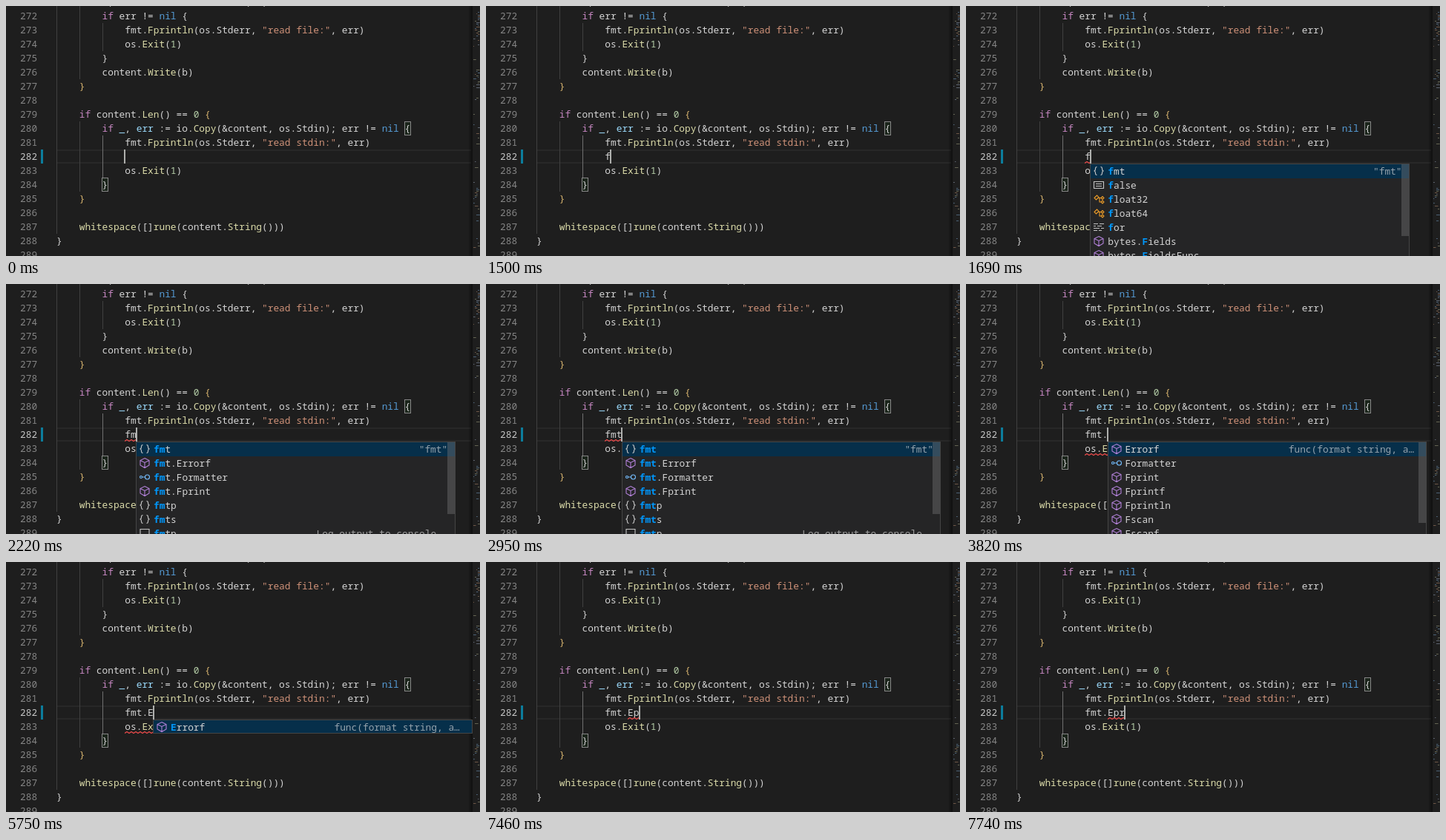
An HTML page with a canvas for the animation above (8000 ms loop, 639x338 px).

```html
<!DOCTYPE html>
<html lang="en">
<head>
<meta charset="utf-8">
<title>Code completion</title>
<style>
html, body { margin: 0; height: 100%; overflow: hidden; background: #1e1e1e; }
canvas { display: block; width: 639px; height: 338px; }
</style>
</head>
<body>
<canvas id="stage"></canvas>
<script>
const W = 639, H = 338, LOOP = 8000;
const CHAR = 7.697, LEFT = 67.93, ROW = 19, FIRST = 271, CURRENT = 282;
const FONT = '12.83px "Noto Sans Mono", "DejaVu Sans Mono", monospace';

const code = `        b, err := ioutil.ReadFile(fn)
        if err != nil {
            fmt.Fprintln(os.Stderr, "read file:", err)
            os.Exit(1)
        }
        content.Write(b)
    }

    if content.Len() == 0 {
        if _, err := io.Copy(&content, os.Stdin); err != nil {
            fmt.Fprintln(os.Stderr, "read stdin:", err)

            os.Exit(1)
        }
    }

    whitespace([]rune(content.String()))
}
`.split('\n');

// string, keyword, constant, number, call, assigned variable, other
const TOKEN = /(".*?")|(\bif\b)|(\bnil\b)|(\b\d+\b)|(\w+(?=\())|(\b(?:_|b|err)\b(?=.*:=))|\w+|[^\w\s"]+/g;
const COLORS = ['#ce9178', '#c586c0', '#569cd6', '#b5cea8', '#dcdcaa', '#9cdcfe'];
const PLAIN = '#d4d4d4', GOLD = '#d9b56f';

const ICONS = {
  module: ['#c5c5c5', 'M5.5 2.5Q3.5 2.5 3.5 5Q3.5 8 1.5 8Q3.5 8 3.5 11Q3.5 13.5 5.5 13.5M10.5 2.5Q12.5 2.5 12.5 5Q12.5 8 14.5 8Q12.5 8 12.5 11Q12.5 13.5 10.5 13.5'],
  value: ['#c5c5c5', 'M1.5 3.5H14.5V12.5H1.5ZM4 6.5H12M4 9.5H12'],
  type: ['#ee9d28', 'M2 6.5L5.5 3L8 5.5L4.5 9ZM7 6.5H11M9 6.5V12H11M11 6.5L13 4.5L15 6.5L13 8.5ZM11 12L13 10L15 12L13 14Z'],
  keyword: ['#c5c5c5', 'M1 3.5H7M9 3.5H15M1 6.5H4M6 6.5H12M1 9.5H9M11 9.5H15M1 12.5H6M8 12.5H12'],
  func: ['#b180d7', 'M8 1.5L14 4.5V11L8 14.5L2 11V4.5ZM2 4.5L8 7.5L14 4.5M8 7.5V14.5'],
  iface: ['#75beff', 'M1.5 8a1.5 1.5 0 1 0 3 0a1.5 1.5 0 1 0 -3 0M4.5 8H8.5M8.5 8a3 3 0 1 0 6 0a3 3 0 1 0 -6 0'],
  snippet: ['#c5c5c5', 'M2 2.5H14V13.5H2Z']
};
for (const icon of Object.values(ICONS)) icon[1] = new Path2D(icon[1]);

// each item: icon, label, detail, gap between the detail and the right edge
const FMT = ['module', 'fmt', '"fmt"', 11];
const ERRORF = ['func', 'Errorf', 'func(format string, a…', 17.5];
const LISTS = {
  letter: [FMT, ['value', 'false'], ['type', 'float32'], ['type', 'float64'],
    ['keyword', 'for'], ['func', 'bytes.Fields'], ['func', 'bytes.FieldsFunc']],
  word: [FMT, ['func', 'fmt.Errorf'], ['iface', 'fmt.Formatter'], ['func', 'fmt.Fprint'],
    ['module', 'fmtp'], ['module', 'fmts'], ['snippet', 'fmtp', 'Log output to console', 26]],
  members: [ERRORF, ['iface', 'Formatter'], ['func', 'Fprint'], ['func', 'Fprintf'],
    ['func', 'Fprintln'], ['func', 'Fscan'], ['func', 'Fscanf']],
  single: [ERRORF]
};
const KEYS = [[0, ''], [1500, 'f'], [2220, 'fm'], [2890, 'fmt'], [3700, 'fmt.'],
  [5750, 'fmt.E'], [7460, 'fmt.Ep'], [7740, 'fmt.Epr']];
const POPUPS = [[0, ''], [1530, 'letter'], [2220, 'word'], [3700, ''], [3760, 'members'],
  [5750, 'single'], [7460, '']];

const canvas = document.getElementById('stage');
const dpr = window.devicePixelRatio || 1;
canvas.width = W * dpr;
canvas.height = H * dpr;
const ctx = canvas.getContext('2d');
ctx.scale(dpr, dpr);

const at = (steps, t) => steps.filter(s => s[0] <= t).pop()[1];
const rowTop = n => 194 + (n - CURRENT) * ROW;
const colX = c => LEFT + c * CHAR;

function rect(x, y, w, h, color) {
  ctx.fillStyle = color;
  ctx.fillRect(x, y, w, h);
}

function text(s, x, top, color, bold) {
  ctx.font = (bold ? 'bold ' : '') + FONT;
  ctx.fillStyle = color;
  ctx.fillText(s, x, top + 14);
}

function codeLine(line, n) {
  const indent = line.search(/\S/);
  for (const m of line.matchAll(TOKEN)) {
    const kind = m.slice(1).findIndex(Boolean);
    const color = indent === 4 && /[{}]/.test(m[0]) ? GOLD : COLORS[kind] || PLAIN;
    text(m[0], colX(m.index), rowTop(n), color);
  }
}

function guide(col, from, to, color = '#404040') {
  rect(Math.round(colX(col)), rowTop(from), 1, (to - from + 1) * ROW, color);
}

function bracketBox(col, n) {
  const x = Math.floor(colX(col)), y = rowTop(n);
  rect(x, y, 9, ROW, 'rgba(0,100,0,.1)');
  ctx.strokeStyle = '#888';
  ctx.lineWidth = 1;
  ctx.strokeRect(x + .5, y + .5, 8, ROW - 1);
}

function squiggle(col, length, n) {
  const x = Math.floor(colX(col)), w = length * CHAR, y = rowTop(n) + 17.5;
  ctx.save();
  ctx.beginPath();
  ctx.rect(x, y - 2, w, 4);
  ctx.clip();
  ctx.beginPath();
  for (let i = 0; i * 3 <= w + 3; i++) ctx.lineTo(x + i * 3, y + (i % 2 ? -1 : 1));
  ctx.strokeStyle = '#f14c4c';
  ctx.lineWidth = 1.1;
  ctx.stroke();
  ctx.restore();
}

function minimap() {
  const shadow = ctx.createLinearGradient(623, 0, 629, 0);
  shadow.addColorStop(0, 'rgba(0,0,0,0)');
  shadow.addColorStop(1, 'rgba(0,0,0,.5)');
  rect(623, 0, 6, H, shadow);
  rect(629, 0, 10, H, '#1e1e1e');
  let seed = 7;
  const rand = () => (seed = seed * 16807 % 2147483647) / 2147483647;
  const tints = ['#5d6470', '#4b6175', '#6d5646', '#656553'];
  for (let y = 2; y < H; y += 2) {
    const dense = (y > 6 && y < 56) || (y > 82 && y < 112) || (y > 244 && y < 262);
    const x = 630 + Math.floor(rand() * 4) * 2, w = 1 + rand() * 4;
    const tint = tints[Math.floor(rand() * 4)];
    if (rand() < (dense ? .75 : .2)) rect(x, y, Math.min(w, W - x), 1, tint);
  }
}

function popup(name, x, typed) {
  const items = LISTS[name], left = Math.floor(x), right = Math.floor(x + 430.5);
  const top = rowTop(CURRENT + 1), height = items.length > 1 ? 230 : ROW;
  const query = typed.split('.').pop().toLowerCase();
  ctx.save();
  ctx.beginPath();
  ctx.rect(left, top, right - left, height);
  ctx.clip();
  rect(left, top, right - left, height, '#454545');
  rect(left + 1, top + 1, right - left - 2, height - 2, '#252526');
  rect(left + 1, top + 1, right - left - 2, items.length > 1 ? ROW : ROW - 2, '#062f4a');
  items.forEach(([kind, label, detail, gap], i) => {
    const y = top + 1 + i * ROW, labelX = x + 23.3;
    const [color, path] = ICONS[kind];
    ctx.save();
    ctx.translate(left + 4, y + 1);
    ctx.strokeStyle = color;
    ctx.lineWidth = 1.1;
    ctx.stroke(path);
    ctx.restore();
    const from = label.toLowerCase().indexOf(query), to = from + query.length;
    text(label.slice(0, from), labelX, y, PLAIN);
    text(label.slice(from, to), labelX + from * CHAR, y, '#0097fb', true);
    text(label.slice(to), labelX + to * CHAR, y, PLAIN);
    if (detail) text(detail, x + 430.5 - gap - detail.length * CHAR, y, i ? '#9f9f9f' : '#96a3ad');
  });
  if (items.length > 1) {
    rect(right - 11, top + 1, 10, name === 'members' ? 109 : 97, 'rgba(121,121,121,.4)');
  }
  ctx.restore();
}

function draw(t) {
  const typed = at(KEYS, t), list = at(POPUPS, t);
  const caret = colX(12 + typed.length), top = rowTop(CURRENT);
  rect(0, 0, W, H, '#1e1e1e');

  rect(68, top, 559, ROW, '#282828');
  rect(68, top + 2, 559, ROW - 4, '#1e1e1e');
  rect(47, top, 3, ROW, '#0c7d9d');

  guide(0, 271, 287);
  guide(4, 271, 276);
  guide(4, 280, 284);
  guide(8, 273, 274);
  guide(8, 281, 283, '#707070');
  bracketBox(61, 280);
  bracketBox(8, 284);

  code.forEach((line, i) => {
    const n = FIRST + i;
    text(String(n), 19, rowTop(n), n === CURRENT ? '#c6c6c6' : '#858585');
    codeLine(line, n);
  });
  text(typed, colX(12), top, PLAIN);

  if (t >= 5940) squiggle(16, typed.length - 4, CURRENT);
  else if (t >= 3820) squiggle(12, 7, CURRENT + 1);
  else if (t >= 1690) squiggle(12, Math.min(typed.length, 3), CURRENT);

  minimap();
  rect(Math.floor(caret - .4), top, 2, ROW, '#aeafad');
  if (list) popup(list, caret, typed);
}

const start = performance.now();
function tick() {
  draw((performance.now() - start) % LOOP);
  requestAnimationFrame(tick);
}
tick();
</script>
</body>
</html>
```
